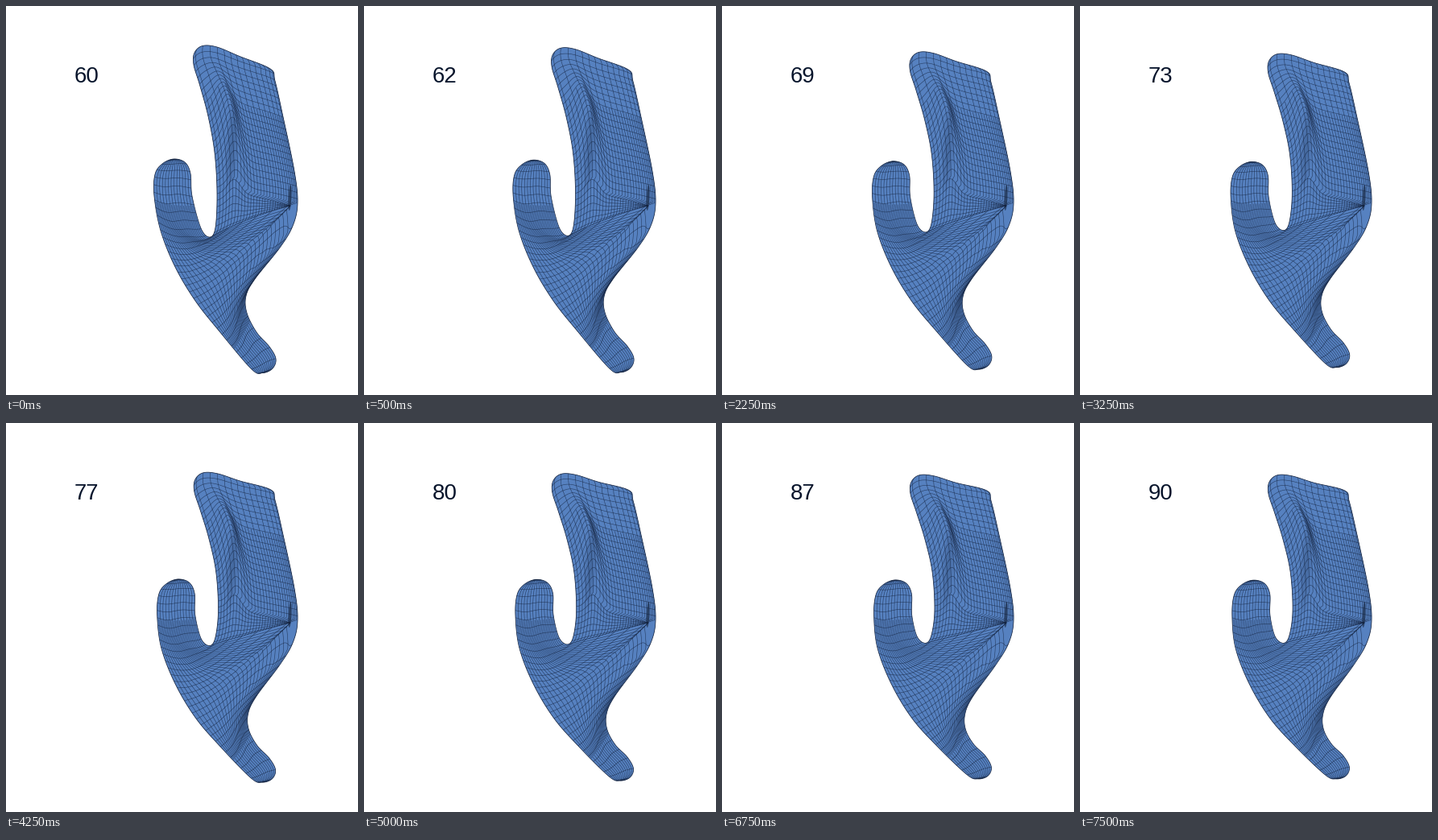
Animation of 437x483 px, one loop 7750 ms. Source, as a matplotlib script:

```python
import numpy as np
import matplotlib.pyplot as plt
from matplotlib.animation import FuncAnimation
from matplotlib.collections import LineCollection
from matplotlib.patches import Ellipse, Polygon

W, H, DPI = 437, 483, 100
FRAMES, INTERVAL = 31, 250
BLUE, INK = "#5681c0", "#14233f"
POLE = np.array([353.0, 248.0])
SUB = 16  # curve samples per key point

# Key points of the rim, clockwise from the notch
RIM = np.array([
    (253, 287), (260, 275), (262, 232), (259, 182), (251, 137), (240.5, 98), (233, 73),
    (234, 58), (244, 49.5), (262, 51), (290, 62.5), (328, 78), (334, 93), (343, 133),
    (358, 205), (362, 245), (356, 273), (340, 300), (309, 339), (298, 360), (299, 381),
    (311, 405), (327, 423), (335, 438), (331, 450), (319, 455.5), (305, 451), (265, 404),
    (235, 366), (210, 324), (192, 279), (184, 236), (185, 209), (194, 196), (208, 190),
    (222, 194), (229, 208), (231, 236), (242, 276)])
NOTCH, TOP_LEFT, TOP_RIGHT, EAST, TAIL, THUMB = 0, 7, 11, 15, 25, 34

# Moving regions: centre, radius, total shift, end of motion, easing power
BUMPS = [
    ((245, 60), 86, (1, 15.5), .77, .7),
    ((305, 450), 60, (-1, -14.5), .77, 1.2),
    ((300, 372), 40, (4, 4), .77, 1.2),
    ((208, 210), 50, (8, 4.5), 1, .5),
    ((250, 286), 30, (-1, -14), .77, .85),
]


def warp(pts, time):
    """Shift points by the sum of soft, eased bumps."""
    pts = np.asarray(pts, float)
    out = pts.copy()
    for centre, radius, shift, end, power in BUMPS:
        near = np.exp(-((pts - centre) ** 2).sum(-1, keepdims=True) / radius ** 2)
        out += near * np.array(shift) * min(1, time / end) ** power
    return out


def closed_spline(p):
    """Catmull-Rom curve through a closed ring of points."""
    a, b, c, d = (np.roll(p, k, axis=0)[:, None] for k in (1, 0, -1, -2))
    f = (np.arange(SUB) / SUB)[None, :, None]
    curve = .5 * (2 * b + (c - a) * f + (2 * a - 5 * b + 4 * c - d) * f ** 2
                  + (3 * b - a - 3 * c + d) * f ** 3)
    return curve.reshape(-1, 2)


def along(path, s):
    """Point at fraction s of a path given by evenly spaced samples."""
    grid = np.linspace(0, 1, len(path))
    return np.stack([np.interp(s, grid, path[:, k]) for k in (0, 1)], -1)


def even(path, n):
    """Resample a path to n points of equal arc length."""
    length = np.r_[0, np.cumsum(np.hypot(*np.diff(path, axis=0).T))]
    s = np.linspace(0, length[-1], n)
    return np.stack([np.interp(s, length, path[:, k]) for k in (0, 1)], -1)


class Shape:
    def __init__(self, time):
        self.outline = closed_spline(warp(RIM, time))
        s = np.linspace(0, 1, 40)[:, None]
        notch = self.outline[0]
        bend = np.array([300, 262])
        self.arc = (1 - s) ** 2 * notch + 2 * s * (1 - s) * bend + s ** 2 * POLE

        self.left = self.section(NOTCH, TOP_LEFT, 120)
        self.cap = self.section(TOP_LEFT, TOP_RIGHT, 80)
        edge = self.section(TOP_RIGHT, EAST, 90)[::-1]
        self.right = np.vstack([np.tile(POLE, (30, 1)), edge])

        self.flank = self.section(TAIL, THUMB, 240)[::-1]
        self.inner = np.vstack([
            self.section(THUMB, len(RIM), 80), self.arc, np.tile(POLE, (24, 1)),
            self.section(EAST + 1, TAIL, 96)])

    def section(self, a, b, n):
        ring = np.vstack([self.outline, self.outline[:1]])
        return even(ring[a * SUB:b * SUB + 1], n)

    def upper(self, u, v):
        """Upper lobe: u from left to right edge, v from notch arc to cap."""
        u, v = np.broadcast_arrays(u, v)
        a, b = u[..., None], v[..., None]
        low, high = self.arc, self.cap
        p = ((1 - b) * along(low, u) + b * along(high, u)
             + (1 - a) * along(self.left, v) + a * along(self.right, v)
             - (1 - b) * ((1 - a) * low[0] + a * low[-1])
             - b * ((1 - a) * high[0] + a * high[-1]))
        arch = np.exp(-((u - .22) / .13) ** 2) * np.sin(np.pi * u)
        p[..., 1] -= 52 * arch * np.sin(np.pi * v) ** 2
        return p

    def lower(self, u, v):
        """Lower body: u from flank to inner side, v from thumb to tail tip."""
        u, v = np.broadcast_arrays(u, v)
        spread = .17 * (1 - u) * np.sin(np.pi * v)
        inner = np.mean([along(self.inner, v + k * spread)
                         for k in np.linspace(-1, 1, 9)], axis=0)
        p = along(self.flank, v)
        p = p + u[..., None] * (inner - p)
        p[..., 1] += 62 * u * (1 - u) * np.exp(-((v - .42) / .16) ** 2)
        return p

    def mesh(self):
        lines = []
        s = np.linspace(0, 1, 120)
        for k in range(1, 28):
            u = 1 - (1 - k / 28) ** 1.3
            lines.append(self.upper(u, s if k % 2 else s * .72))
        for v in np.linspace(0, 1, 30)[:-1]:
            lines.append(self.upper(s, v))

        for k in range(1, 26):
            v = .2 + .65 * s if k % 2 else s
            lines.append(self.lower(k / 26, v))
        for v in np.linspace(.02, .98, 34):
            wave = .008 * np.sin(7 * s) * np.sin(np.pi * v)
            lines.append(self.lower(s, v + wave))
        return lines


fig = plt.figure(figsize=(W / DPI, H / DPI), dpi=DPI, facecolor="white")
ax = fig.add_axes([0, 0, 1, 1])
ax.set_xlim(0, W)
ax.set_ylim(H, 0)
ax.axis("off")

body = Polygon([(0, 0), (1, 1)], fc=BLUE, ec="none")
hollow = [Ellipse((0, 0), 4 + 4 * k, 60 + 20 * k, angle=4, fc=INK, ec="none", alpha=.06)
          for k in range(4)]
pit = Ellipse((352.5, 238), 4, 32, angle=3, fc="#0a1222", ec="none", alpha=.5)
wires = LineCollection([], colors=INK, linewidths=.42, alpha=.72)
edge = Polygon([(0, 0), (1, 1)], fc="none", ec=INK, lw=.55)
for patch in (body, *hollow, pit):
    ax.add_patch(patch)
ax.add_collection(wires)
ax.add_patch(edge)
label = ax.text(84.4, 94.7, "", family="Liberation Sans", fontsize=27.6 * 72 / DPI,
                color="#07142b", va="baseline")


def draw(step):
    time = step / (FRAMES - 1)
    shape = Shape(time)
    body.set_xy(shape.outline)
    edge.set_xy(shape.outline)
    for shade in hollow:
        shade.set_center(warp((281, 170), time))
        shade.set_clip_path(body)
    wires.set_segments(shape.mesh())
    wires.set_clip_path(body)
    label.set_text(str(60 + step))
    return body, edge, wires, label


anim = FuncAnimation(fig, draw, frames=FRAMES, interval=INTERVAL, repeat=True,
                     repeat_delay=0, blit=False)
plt.show()
```
